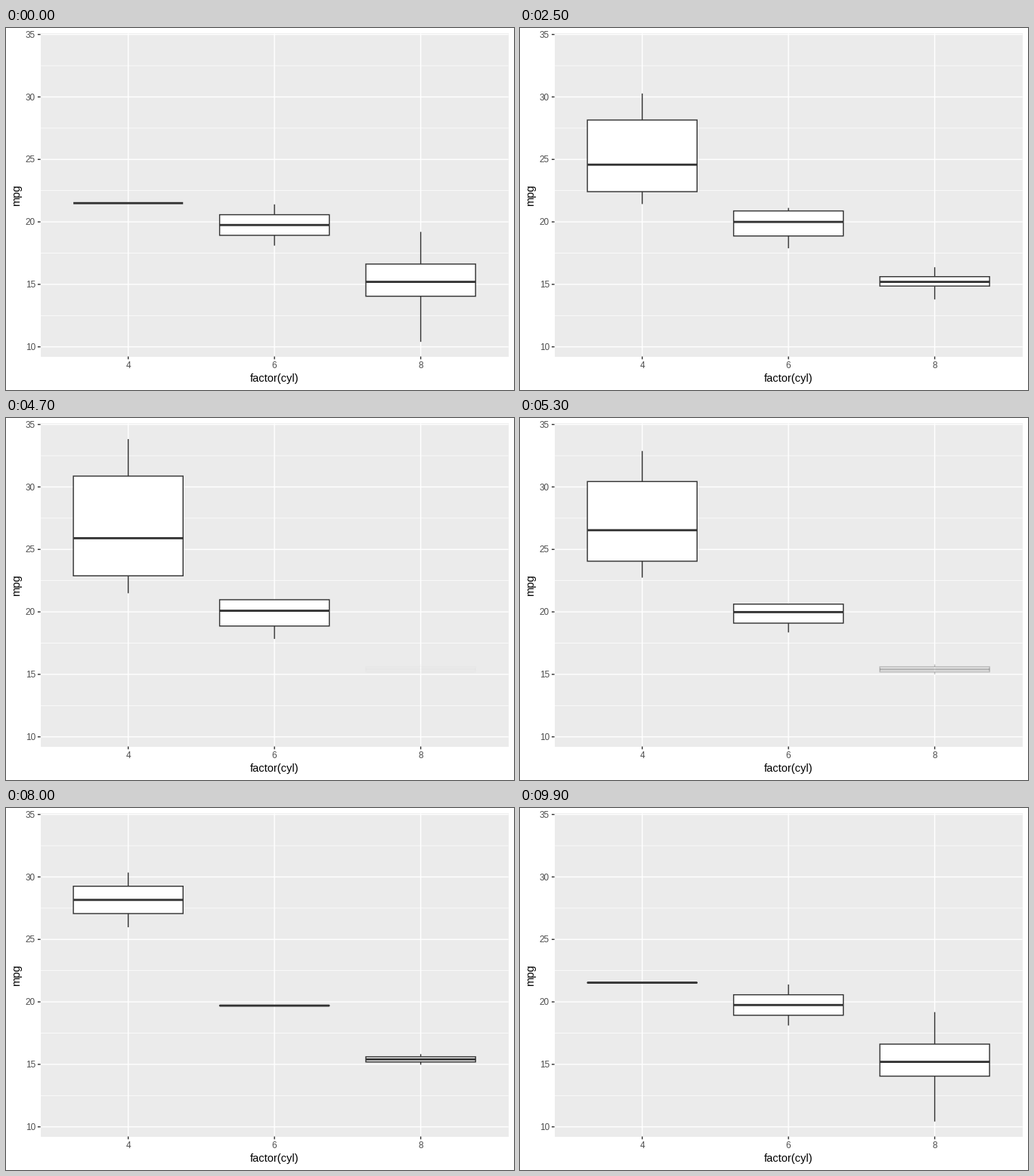
Recreate the animation shown at these times as a matplotlib script. Size 672x480 px, loop 10000 ms.

```python
import math

import matplotlib
import matplotlib.pyplot as plt
import numpy as np
from matplotlib.animation import FuncAnimation
from matplotlib.patches import Polygon, Rectangle

W, H, DPI = 672, 480, 96
FRAMES, INTERVAL = 100, 100

matplotlib.rcParams["font.family"] = "Liberation Sans"

# Panel edges in pixels
LEFT, RIGHT, TOP, BOTTOM = 45.6, 664.67, 7.33, 435.6
Y_MIN, Y_MAX = 9.225, 35.075
LINE = 1.42
TICK = 3.67
DARK = "#333333"

# Values per gear (rows) and number of cylinders (columns)
GROUPS = [
    [[21.5], [18.1, 21.4],
     [10.4, 10.4, 13.3, 14.3, 14.7, 15.2, 15.2, 15.5, 16.4, 17.3, 18.7, 19.2]],
    [[21.4, 22.8, 22.8, 24.4, 27.3, 30.4, 32.4, 33.9],
     [17.8, 19.2, 21.0, 21.0], None],
    [[26.0, 30.4], [19.7], [15.0, 15.8]],
]
# Frames between which each state turns into the next
MOVES = [(11, 33), (45, 67), (79, 100)]


def summary(values):
    return None if values is None else np.percentile(values, [0, 25, 50, 75, 100])


STATES = [[summary(v) for v in row] for row in GROUPS]


def px(slot):
    return LEFT + (slot + 0.6) * (RIGHT - LEFT) / 3.2


def py(value):
    return BOTTOM - (value - Y_MIN) * (BOTTOM - TOP) / (Y_MAX - Y_MIN)


HALF = 0.375 * (RIGHT - LEFT) / 3.2

fig = plt.figure(figsize=(W / DPI, H / DPI), dpi=DPI, facecolor="white")
ax = fig.add_axes([0, 0, 1, 1])
ax.set_xlim(0, W)
ax.set_ylim(H, 0)
ax.axis("off")


def line(xs, ys, color, width, z):
    item, = ax.plot(xs, ys, color=color, lw=width * 72 / DPI, zorder=z,
                    solid_capstyle="butt", snap=False)
    return item


def label(x, y, text, size, color, ha="center", rotation=0):
    ax.text(x, y, text, fontsize=size, color=color, ha=ha, va="baseline",
            rotation=rotation, rotation_mode="anchor")


def draw_panel():
    ax.add_patch(Rectangle((46, 7), 619, 429, fc="#EBEBEB", lw=0, zorder=0))
    for v in np.arange(12.5, 35, 5):
        line([LEFT, RIGHT], [py(v)] * 2, "white", LINE / 2, 1)
    for v in range(10, 36, 5):
        y = py(v)
        line([LEFT, RIGHT], [y, y], "white", LINE, 2)
        line([LEFT - TICK, LEFT], [y, y], DARK, LINE, 2)
        label(39, y + 4.2, str(v), 8.8, "#4D4D4D", ha="right")
    for slot, name in enumerate("468"):
        x = px(slot)
        line([x, x], [TOP, BOTTOM], "white", LINE, 2)
        line([x, x], [BOTTOM, BOTTOM + TICK], DARK, LINE, 2)
        label(x, 451, name, 8.8, "#4D4D4D")
    label((LEFT + RIGHT) / 2, 469, "factor(cyl)", 11, "black")
    label(18, (TOP + BOTTOM) / 2, "mpg", 11, "black", rotation=90)


class Box:
    def __init__(self, slot):
        self.x = px(slot)
        self.ends = [self.x - HALF, self.x + HALF]
        self.whiskers = [line([self.x] * 2, [0, 0], DARK, LINE, 3) for _ in range(2)]
        self.body = Polygon([[0, 0]] * 4, closed=True, lw=LINE * 72 / DPI,
                            joinstyle="miter", snap=False, zorder=4)
        ax.add_patch(self.body)
        self.median = line(self.ends, [0, 0], DARK, 2 * LINE, 5)

    def show(self, stats, alpha):
        seen = stats is not None and alpha > 0
        for item in (*self.whiskers, self.body, self.median):
            item.set_visible(seen)
        if not seen:
            return
        low, q1, mid, q3, high = (py(v) for v in stats)
        a, b = self.ends
        self.whiskers[0].set_ydata([low, q1])
        self.whiskers[1].set_ydata([q3, high])
        self.median.set_ydata([mid, mid])
        self.body.set_xy([(a, q3), (a, q1), (b, q1), (b, q3)])
        self.body.set_facecolor((1, 1, 1, alpha))
        self.body.set_edgecolor((0.2, 0.2, 0.2, alpha))
        self.body.set_visible(q1 - q3 > 1e-6)
        for item in (*self.whiskers, self.median):
            item.set_alpha(alpha)


def phase(frame):
    """Return the state left, the state entered and the eased progress."""
    for i, (start, end) in enumerate(MOVES):
        if frame <= start:
            return i, i, 0.0
        if frame < end:
            t = (frame - start) / (end - start)
            return i, (i + 1) % 3, (1 - math.cos(math.pi * t)) / 2
    return 0, 0, 0.0


def blend(old, new, e):
    if old is None:
        return new, e                       # fade in
    if new is None:
        new = np.full(5, old[2])            # shrink to the median
    return old + (new - old) * e, 1.0


draw_panel()
boxes = [Box(slot) for slot in range(3)]


def update(frame):
    i, j, e = phase(frame)
    for box, old, new in zip(boxes, STATES[i], STATES[j]):
        if i == j:
            box.show(old, 1.0)
        else:
            box.show(*blend(old, new, e))
    return []


anim = FuncAnimation(fig, update, frames=FRAMES, interval=INTERVAL,
                     init_func=lambda: update(0), repeat=True, repeat_delay=0)
plt.show()
```
